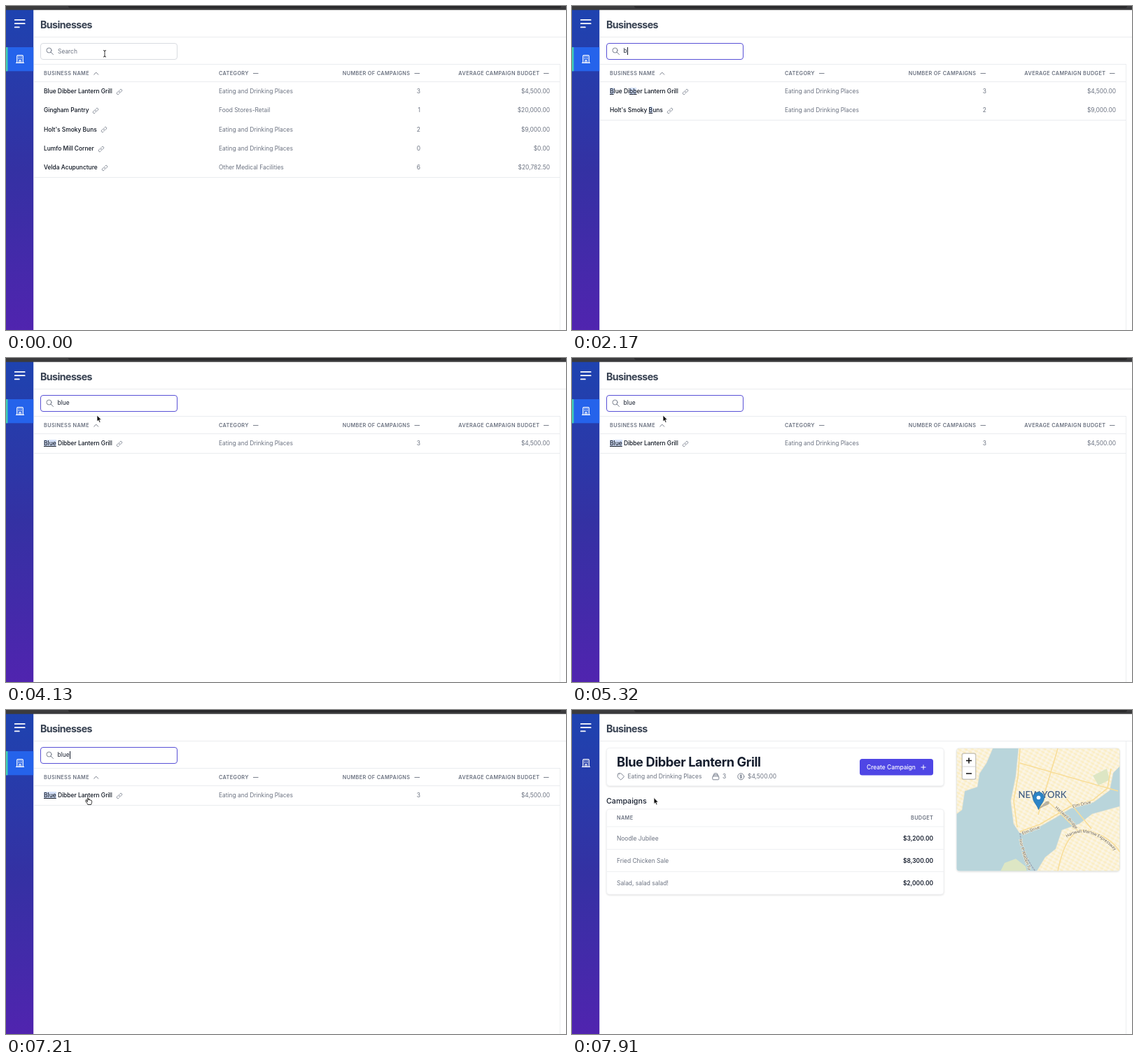
An HTML page for the animation above (8 s loop, 800 by 464 pixels).

```html
<!DOCTYPE html>
<html lang="en">
<head>
<meta charset="utf-8">
<title>Businesses</title>
<style>
  html, body { margin: 0; width: 100%; height: 100%; overflow: hidden; background: #fff; }
  body { position: relative; font: 400 8.42px Inter, sans-serif; color: #6b7280; }
  svg.layer { position: absolute; left: 0; top: 0; width: 800px; height: 464px; }
  svg text { dominant-baseline: central; fill: #6b7280; }
  svg .title { font-size: 14.2px; font-weight: 700; letter-spacing: -.04em; fill: #374151; }
  svg .name { font-size: 18.2px; font-weight: 700; letter-spacing: -.022em; fill: #161e2e; }
  svg .head { font-size: 7.3px; font-weight: 600; letter-spacing: .05em; }
  svg .sub { font-size: 10.7px; font-weight: 500; fill: #161e2e; }
  svg .strong { font-weight: 600; fill: #161e2e; }
  svg .end { text-anchor: end; }
  svg .mid { text-anchor: middle; }
  svg .road { font: 6px "Open Sans", sans-serif; fill: #5c5348; stroke: #fdf6e0; stroke-width: 1.2px; paint-order: stroke; }
  .icon { fill: none; stroke: #7b8290; stroke-width: 2; stroke-linecap: round; stroke-linejoin: round; }
  .rule { stroke: #eaecef; fill: none; }
  .card { fill: #fff; stroke: #f1f2f4; filter: drop-shadow(0 1px 1px rgba(0, 0, 0, .12)); }
  #search { position: absolute; left: 49px; top: 53px; width: 196px; height: 24px; box-sizing: border-box;
    border: 1px solid #d9dce1; border-radius: 4px; padding-left: 24px; line-height: 22px; white-space: pre; }
  #search.focus { border: 1.5px solid #5850d6; padding-left: 23.5px; line-height: 21px; }
  #search svg { position: absolute; left: 7px; top: 5px; }
  #typed { color: #161e2e; }
  #caret { display: inline-block; width: 1px; height: 11px; margin-right: -1px; background: #161e2e; vertical-align: middle; }
  .row { position: absolute; left: 40px; width: 752px; height: 27.35px; line-height: 27.35px; }
  .row > * { position: absolute; top: 0; white-space: nowrap; }
  .row b { left: 14px; font-weight: 500; color: #0d1420; display: flex; align-items: center; }
  .row b svg { margin-left: 5px; }
  .row .cat { left: 264px; }
  .row .count { right: 200px; }
  .row .budget { right: 15px; }
  mark { background: #d5e1fa; color: inherit; text-decoration: underline; }
</style>
</head>
<body>
<svg class="layer" id="base"></svg>
<div id="list">
  <div id="search"><span id="typed"></span><i id="caret"></i><span id="hint">Search</span></div>
  <div id="rows"></div>
</div>
<svg class="layer" id="pointer">
  <path id="text" d="M-2-4.500Q0-4.500 0-3Q0-4.500 2-4.500M0-4V4.500M-2 5Q0 5 0 3.500Q0 5 2 5" fill="none" stroke="#222" stroke-width=".9"/>
  <path id="arrow" d="M0 0V9L2 7.200L3.500 10.400L5 9.700L3.600 6.600H6.300Z" fill="#111" stroke="#fff" stroke-width=".7"/>
  <path id="hand" d="M-.8 .8Q0-.4 .9 .8V3.600Q2-.1 2 3.300Q4 2.600 4 4Q5.600 3.500 5.600 5V7Q5 8.500 4.600 10H-.2Q-.8 8-3.200 5.600Q-3-.0 -.8 6.200Z" fill="#fff" stroke="#222" stroke-width=".9" stroke-linejoin="round"/>
</svg>
<script>
const LOOP = 8000, OPEN = 7490, MAP = 7700, FOCUS = 980;
const $ = id => document.getElementById(id);
const show = (el, on) => { el.style.display = on ? '' : 'none'; };

const place = 'Eating and Drinking Places';
const businesses = [
  ['Blue Dibber Lantern Grill', place, 3, '$4,500.00'],
  ['Gingham Pantry', 'Food Stores-Retail', 1, '$20,000.00'],
  ["Holt's Smoky Buns", place, 2, '$9,000.00'],
  ['Lumfo Mill Corner', place, 0, '$0.00'],
  ['Velda Acupuncture', 'Other Medical Facilities', 6, '$20,782.50']
];
const campaigns = [['Noodle Jubilee', '$3,200.00'], ['Fried Chicken Sale', '$8,300.00'], ['Salad, salad salad!', '$2,000.00']];

const icons = {
  menu: 'M4 6h16M4 12h16M4 18h7',
  office: 'M19 21V5a2 2 0 00-2-2H7a2 2 0 00-2 2v16m14 0h2m-2 0h-5m-9 0H3m2 0h5M9 7h1m-1 4h1m4-4h1m-1 4h1m-5 10v-5a1 1 0 011-1h2a1 1 0 011 1v5m-4 0h4',
  search: 'M21 21l-7-7m2-5a7 7 0 11-14 0 7 7 0 0114 0z',
  link: 'M13.828 10.172a4 4 0 00-5.656 0l-4 4a4 4 0 105.656 5.656l1.102-1.101m-.758-4.899a4 4 0 005.656 0l4-4a4 4 0 00-5.656-5.656l-1.1 1.1',
  tag: 'M7 7h.01M7 3h5c.512 0 1.024.195 1.414.586l7 7a2 2 0 010 2.828l-7 7a2 2 0 01-2.828 0l-7-7A2 2 0 013 12V7a4 4 0 014-4z',
  stack: 'M19 11H5m14 0a2 2 0 012 2v6a2 2 0 01-2 2H5a2 2 0 01-2-2v-6a2 2 0 012-2m14 0V9a2 2 0 00-2-2M5 11V9a2 2 0 012-2m0 0V5a2 2 0 012-2h6a2 2 0 012 2v2M7 7h10',
  money: 'M12 8c-1.657 0-3 .895-3 2s1.343 2 3 2 3 .895 3 2-1.343 2-3 2m0-8c1.11 0 2.08.402 2.599 1M12 8V7m0 1v8m0 0v1m0-1c-1.11 0-2.08-.402-2.599-1M21 12a9 9 0 11-18 0 9 9 0 0118 0z'
};
const icon = (name, cx, cy, size, style = '') =>
  `<path class="icon" d="${icons[name]}" style="${style}" transform="translate(${cx - size / 2} ${cy - size / 2}) scale(${size / 24})"/>`;
const text = (x, y, str, cls = '') => `<text x="${x}" y="${y}" class="${cls}">${str}</text>`;
const line = (d, color = '#eaecef') => `<path d="${d}" class="rule" style="stroke:${color}"/>`;
const card = (x, y, w, h) => `<rect class="card" x="${x}" y="${y}" width="${w}" height="${h}" rx="4"/>`;

const chrome = `
  <defs><linearGradient id="side" x2="0" y2="1">
    <stop stop-color="#1e43b0"/><stop offset=".5" stop-color="#3431a3"/><stop offset="1" stop-color="#5024af"/>
  </linearGradient></defs>
  <rect y="5" width="39.200" height="459" fill="url(#side)"/>
  <rect width="800" height="5.700" fill="#3b3b3d"/>
  <rect x="89" y="-4" width="704" height="7" rx="3" fill="#29292b"/>
  <g id="active"><rect y="59" width="39.200" height="34.300" fill="#2563eb"/><rect y="59" width="2.500" height="34.300" fill="#40cbb5"/></g>
  ${icon('menu', 19.7, 25.2, 21, 'stroke:#fff')}
  ${icon('office', 20, 76, 14.6, 'stroke:#fff')}
  ${line('M40 44.500H800')}`;

const listPage = `<g id="listPage">
  ${text(49, 26, 'Businesses', 'title')}
  ${line('M40 83.500H792M40 108.500H792')}${line('M791.500 84V464', '#eceef0')}
  ${text(54, 96.5, 'BUSINESS NAME', 'head')}${text(304, 96.5, 'CATEGORY', 'head')}
  ${text(577.4, 96.5, 'NUMBER OF CAMPAIGNS', 'head end')}${text(762.4, 96.5, 'AVERAGE CAMPAIGN BUDGET', 'head end')}
  ${line('M125.500 98.500L128.700 95L132 98.500M353 96.500H360.500M583.500 96.500H591M768 96.500H775.500', '#7b818d')}
  <path id="lastRule" class="rule"/></g>`;

const map = `<g id="map">
  <defs>
    <clipPath id="mapClip"><rect x="549.500" y="55" width="233" height="175.500" rx="4"/></clipPath>
    <pattern id="blocks" width="7" height="5" patternUnits="userSpaceOnUse" patternTransform="rotate(29)">
      <path fill="#f8f0da" d="M0 0H7V5H0Z"/><path d="M0 1.500H7M2 0V5" stroke="#fcedbd" stroke-width="1"/><path d="M0 4H7M5 0V5" stroke="#fffaf0" stroke-width=".7"/>
    </pattern>
    <path id="bridge" d="M691 139Q707 151 723 172"/>
    <path id="express" d="M706 181Q738 160 776 199"/>
    <path id="tunnel" d="M641 185Q644 205 657 236"/>
    <path id="shoreA" d="M643 177L669 167"/>
    <path id="shoreB" d="M715 138L744 131"/>
  </defs>
  <g clip-path="url(#mapClip)">
    <path fill="#b9d5db" d="M549 55H783V231H549Z"/>
    <g fill="url(#blocks)" stroke="#efe6cf" stroke-width=".6">
      <path d="M549 55H601L592 76L582 91L579 110L561 116L557 143L549 149Z"/>
      <path d="M638 55L634 95L627 130L631 163L640 177L668 167L691 154L712 141L745 132L768 115L773 90L783 80V55Z"/>
      <path d="M664 231L676 211L691 199L700 172L725 163L743 149L783 138V231Z"/>
    </g>
    <path fill="#dde6c4" d="M612 231L618 219L634 213L648 224L650 231ZM744 94L764 84L768 100L752 108Z"/>
    <g fill="none" stroke="#f8dd98" stroke-width="1.500">
      <path d="M640 174L668 164L690 151L712 138L744 129L765 112L770 84M640 55L637 96L631 130L636 168"/>
      <path d="M682 133L724 174M704 124L742 170M640 76L780 116M694 55L666 150M694 231Q707 165 738 173T783 204"/>
    </g>
    <path d="M640 176Q643 206 662 231" fill="none" stroke="#9fa9b7" stroke-width="1.500" stroke-dasharray="3 1"/>
    ${[['shoreA', 'Elm Drive'], ['shoreB', 'Elm Drive'], ['bridge', 'Hartwell Bridge'], ['express', 'Hartwell Marlow Expressway'], ['tunnel', 'Ivor P. Maden Tu']]
      .map(([id, label]) => `<text class="road"><textPath href="#${id}">${label}</textPath></text>`).join('')}
    <text x="672" y="121" class="mid" style="font:600 13px Lato,sans-serif;fill:#46607f;stroke:#fff8;stroke-width:1.500px;paint-order:stroke">NEW YORK</text>
    <path d="M666 142L677 131Q684 129 681 135Z" fill="#0004"/>
    <path d="M666.500 142.500C664 135 658.500 132 658.500 125.500A8 8 0 01674.500 125.500C674.500 132 669 135 666.500 142.500Z" fill="#2c84c6" stroke="#2570a8" stroke-width=".8"/>
    <circle cx="666.500" cy="125.500" r="2.800" fill="#fff"/>
  </g></g>
  <g id="zoom"><rect x="557.300" y="62.300" width="19.400" height="37" rx="2.500" fill="#fff" stroke="#0003" stroke-width="1.400"/>
    <path d="M557.500 81H576.500" stroke="#ccc" stroke-width=".8"/><path d="M563 72.500H571M567 68.500V76.500M563 91H571" stroke="#111" stroke-width="1.500"/></g>`;

const detailPage = `<g id="detailPage">
  ${text(49, 26, 'Business', 'title')}${line('M791.500 45V464', '#eceef0')}
  ${card(49.5, 54.5, 481.5, 54)}
  ${text(64, 73.5, businesses[0][0], 'name')}
  ${icon('tag', 69.7, 95.3, 12)}${text(79.5, 95.3, place)}
  ${icon('stack', 205.3, 95.3, 12)}${text(215, 95.3, '3')}
  ${icon('money', 241.3, 95.3, 12)}${text(251, 95.3, '$4,500.00')}
  <rect x="411" y="70" width="105" height="23.500" rx="3.500" fill="#4f46e5"/>
  <text x="421" y="82" style="fill:#fff;font-weight:500">Create Campaign</text>
  <path d="M498.500 82H505.500M502 78.500V85.500" stroke="#fff"/>
  ${text(49, 130, 'Campaigns', 'sub')}
  ${card(49.5, 142, 481.5, 122)}
  ${text(64, 154.5, 'NAME', 'head')}${text(516.3, 154.5, 'BUDGET', 'head end')}
  ${line('M50 167H531M50 199.500H531M50 231.500H531', '#eef0f2')}
  ${campaigns.map(([name, budget], i) => text(64, 183.5 + 32 * i, name) + text(516, 183.5 + 32 * i, budget, 'strong end')).join('')}
  ${card(549.5, 54.5, 232.5, 176)}${map}</g>`;

$('base').innerHTML = chrome + listPage + detailPage;
$('search').insertAdjacentHTML('beforeend', `<svg width="12" height="12">${icon('search', 6, 6, 12)}</svg>`);

const typing = [[2030, 'b'], [2240, 'bl'], [2380, 'blu'], [2550, 'blue']];
const path = [[0, 141, 68], [3080, 141, 68], [3290, 136, 71], [3780, 130, 82], [6650, 130, 82], [7150, 117, 125.5], [LOOP, 117, 125.5]];
const rowTop = 109, rowHeight = 27.35;
let shownQuery = null;

function renderRows(query) {
  if (query === shownQuery) return;
  shownQuery = query;
  const found = businesses.filter(b => b[0].toLowerCase().includes(query));
  const highlight = name => query ? name.replace(new RegExp(query, 'gi'), '<mark>$&</mark>') : name;
  $('rows').innerHTML = found.map(([name, cat, count, budget], i) =>
    `<div class="row" style="top:${rowTop + i * rowHeight}px"><b><span>${highlight(name)}</span>
     <svg width="10" height="10">${icon('link', 5, 5, 10)}</svg></b><span class="cat">${cat}</span>
     <span class="count">${count}</span><span class="budget">${budget}</span></div>`).join('');
  $('lastRule').setAttribute('d', `M40 ${Math.floor(rowTop + found.length * rowHeight) + .5}H792`);
  $('typed').textContent = query;
  show($('hint'), !query);
}

function caretVisible(t) {
  if (t < FOCUS) return false;
  if (t < 2030) return t < 1400 || t >= 1890;
  return t < 2550 || Math.floor((t - 2550) / 527) % 2 === 0;
}

function pointerAt(t) {
  const i = path.findIndex(p => p[0] > t);
  const [a, b] = [path[i - 1], path[i]];
  const k = (t - a[0]) / (b[0] - a[0]), e = k * k * (3 - 2 * k);
  return [a[1] + (b[1] - a[1]) * e, a[2] + (b[2] - a[2]) * e];
}

function render(t) {
  const detail = t >= OPEN;
  show($('list'), !detail);
  show($('listPage'), !detail);
  show($('active'), !detail);
  show($('detailPage'), detail);
  show($('zoom'), t >= MAP);
  $('map').style.opacity = Math.min(1, Math.max(0, (t - MAP) / 200));

  renderRows(typing.reduce((query, [at, value]) => t >= at ? value : query, ''));
  $('search').classList.toggle('focus', t >= FOCUS);
  $('caret').style.visibility = caretVisible(t) ? 'visible' : 'hidden';

  const [x, y] = pointerAt(t);
  const kind = y < 77 ? 'text' : y > 116 && !detail ? 'hand' : 'arrow';
  for (const id of ['text', 'arrow', 'hand']) {
    show($(id), id === kind);
    $(id).setAttribute('transform', `translate(${x} ${y})`);
  }
  show($('pointer'), t < 2030 || t >= 3080);
}

const start = performance.now();
function tick() {
  render((performance.now() - start) % LOOP);
  requestAnimationFrame(tick);
}
tick();
</script>
</body>
</html>
```
